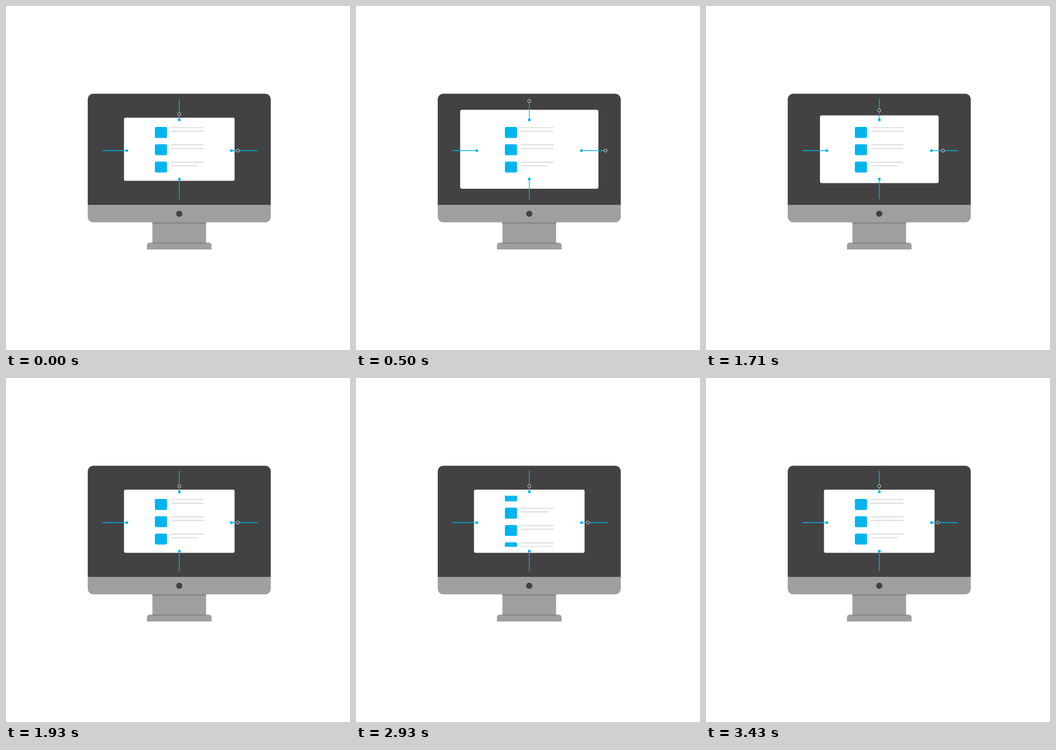
Animation, 640 px wide and 640 px high, one loop 3780 ms. Source, as an HTML page:

```html
<!DOCTYPE html>
<html lang="en">
<head>
<meta charset="utf-8">
<title>Responsive screen</title>
<style>
  html, body { margin: 0; width: 100%; height: 100%; overflow: hidden; background: #fff; }
  svg { display: block; width: 100vw; height: 100vh; }
  .dark { fill: #424242; }
  .metal { fill: #9f9f9f; }
  .seam { fill: #7f7f7f; }
  .blue { fill: #00b4f0; }
  .guide { stroke: #00b4f0; stroke-width: 1.3; }
  .ring { fill: #424242; stroke: #dadada; stroke-width: 1; }
  .text { stroke: #dedede; stroke-width: 2.1; stroke-linecap: round; }
</style>
</head>
<body>
<svg viewBox="0 0 640 640">
  <defs>
    <clipPath id="view"><rect x="270" y="219" width="105" height="95"/></clipPath>
  </defs>

  <rect class="metal" x="272.4" y="402" width="99.9" height="40"/>
  <path class="metal" d="M262.2 453V445.2a5 5 0 0 1 5-5H377.5a5 5 0 0 1 5 5V453Z"/>
  <rect class="seam" x="272.4" y="402.4" width="100" height="2.2"/>
  <rect class="seam" x="272.4" y="440" width="99.9" height="1.8"/>
  <path class="dark" d="M152.1 370.2V173.2a10 10 0 0 1 10-10H482.6a10 10 0 0 1 10 10V370.2Z"/>
  <path class="metal" d="M152.1 370V392.5a10 10 0 0 0 10 10H482.6a10 10 0 0 0 10-10V370Z"/>
  <circle class="dark" cx="322.3" cy="386.5" r="5.8"/>

  <rect id="page" fill="#fff" x="-102.9" y="-58.8" width="205.8" height="117.6" rx="3"/>
  <g clip-path="url(#view)"><g id="list"></g></g>
  <g id="guides"></g>
  <circle id="ringY" class="ring" cx="322.4" r="2.9"/>
  <circle id="ringX" class="ring" cy="269" r="2.9"/>
</svg>
<script>
  const LOOP = 3780, FPS = 14, PITCH = 32.2;
  const OPEN = 0, CLOSE = 1405, ZOOM = 500;
  const SCROLL = 2663, SCROLL_TIME = 750;

  const $ = id => document.getElementById(id);

  function add(parent, tag, attrs) {
    const el = document.createElementNS('http://www.w3.org/2000/svg', tag);
    for (const key in attrs) el.setAttribute(key, attrs[key]);
    parent.appendChild(el);
  }

  function addRow(i) {
    const y = 225 + i * PITCH;
    const isShort = (i + 6) % 3 === 2;
    add($('list'), 'rect', { class: 'blue', x: 277, y, width: 22.5, height: 20.4, rx: 2.5 });
    [1.2, 7.9].forEach((dy, n) => add($('list'), 'line', {
      class: 'text', x1: 307.4, x2: isShort && n ? 356 : 366.6, y1: y + dy, y2: y + dy
    }));
  }

  // Outer end first, then the end that carries the dot
  function addGuide(x1, y1, x2, y2) {
    add($('guides'), 'line', { class: 'guide', x1, y1, x2, y2 });
    add($('guides'), 'circle', { class: 'blue', cx: x2, cy: y2, r: 2.6 });
  }

  for (let i = -6; i < 3; i++) addRow(i);
  addGuide(322.4, 172.6, 322.4, 211.8);
  addGuide(322.4, 359.6, 322.4, 322);
  addGuide(179.4, 269, 224.7, 269);
  addGuide(468.6, 269, 419.3, 269);

  // Quadratic ease in and out
  function ease(t, start, time) {
    const p = Math.min(1, Math.max(0, (t - start) / time));
    return p < 0.5 ? 2 * p * p : 1 - 2 * (1 - p) ** 2;
  }

  function draw(t) {
    const zoom = ease(t, OPEN, ZOOM) - ease(t, CLOSE, ZOOM);
    const shift = 6 * PITCH * ease(t, SCROLL, SCROLL_TIME);
    $('page').setAttribute('transform', `translate(322.4 266.5) scale(${1 + 0.25 * zoom})`);
    $('ringY').setAttribute('cy', 201.3 - 24.4 * zoom);
    $('ringX').setAttribute('cx', 431.4 + 32.6 * zoom);
    $('list').setAttribute('transform', `translate(0 ${shift})`);
  }

  // Motion runs at 14 steps a second, each starting on a whole 10 ms
  function stepTime(ms) {
    const tick = Math.floor(ms / 10) * 10 + 5;
    return Math.floor(tick * FPS / 1000) * 1000 / FPS;
  }

  const begin = performance.now();
  function loop() {
    draw(stepTime((performance.now() - begin) % LOOP));
    requestAnimationFrame(loop);
  }
  loop();
</script>
</body>
</html>
```
